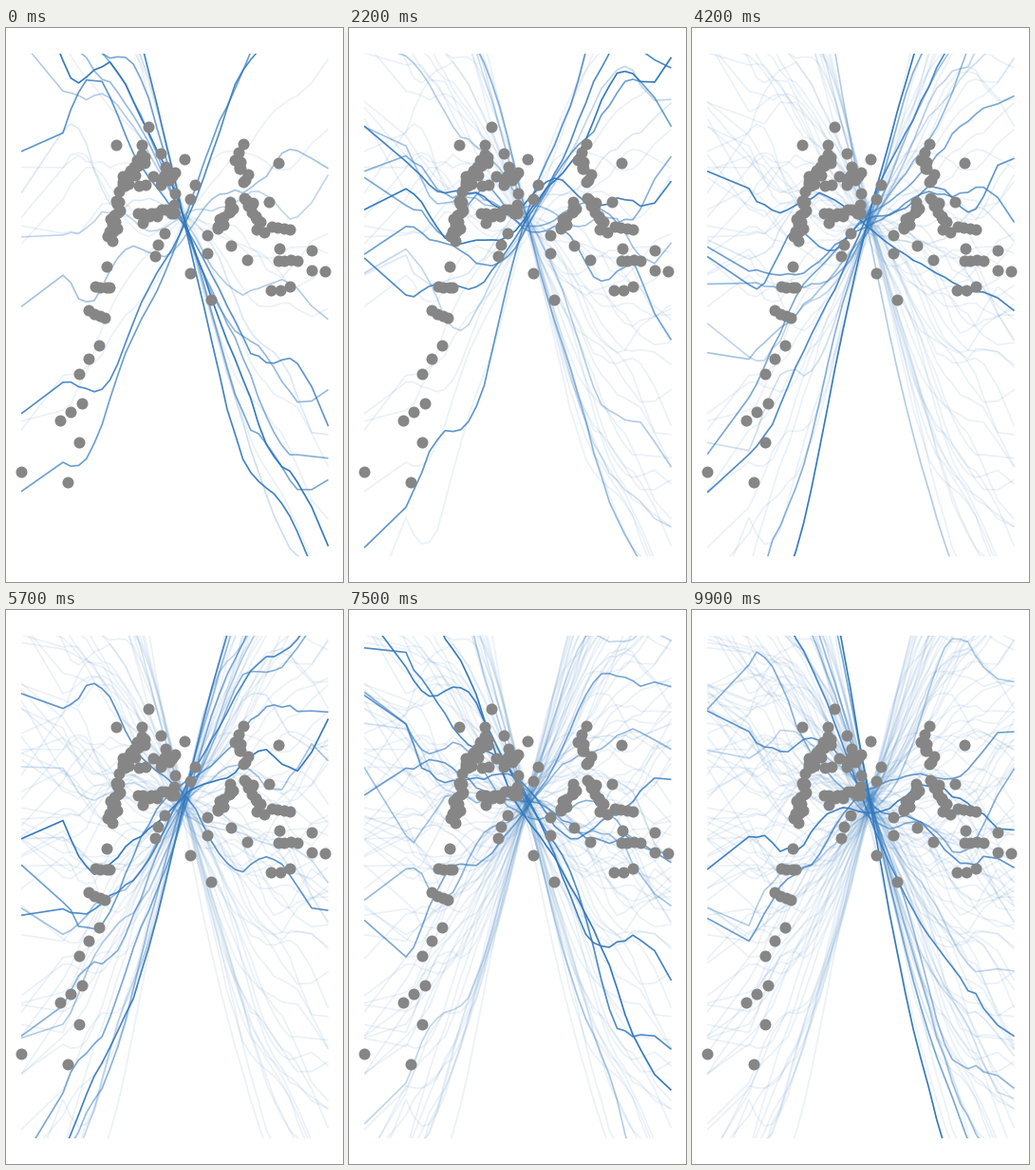
A matplotlib script for the animation above (10 s loop, 355 by 583 pixels).

```python
import numpy as np
import matplotlib.pyplot as plt
from matplotlib.animation import FuncAnimation
from matplotlib.collections import LineCollection

W, H, DPI = 355, 583, 100
X0, X1, Y0, Y1 = 16, 339.5, 26.5, 556
FRAMES, STEP = 100, 100
LEAD = 22            # draws already on stage when the loop starts
FADE, FAINT = 13, 0.10
NECK = (187, 203)    # all curves pass close to this point
REACH = 110          # distance over which a curve levels off
BLUE = (0.20, 0.475, 0.745)
GREY = "#868686"

rng = np.random.default_rng(7)


def strand(x0, y0, x1, y1, n):
    """n points along a segment; long strands are scattered more."""
    t = np.linspace(0, 1, n)[:, None]
    path = np.array([x0, y0]) * (1 - t) + np.array([x1, y1]) * t
    return path + rng.normal(0, 0.8 if n < 6 else 3.5, (n, 2))


loners = [(16, 467), (64.5, 478), (77, 436), (116, 123), (150, 104), (188, 138),
          (193.5, 258), (216, 286), (250, 122), (287, 142), (277, 183),
          (322, 234), (288, 232), (106, 251)]

dots = np.vstack([
    loners,
    # lower left tail
    strand(57, 413, 80, 396, 3),
    strand(77, 363, 98, 334, 3),
    strand(87, 298, 106, 306, 4),
    strand(95, 272, 111, 273, 4),
    # left cloud
    strand(112, 224, 117, 180, 14),
    strand(119, 170, 149, 130, 22),
    strand(140, 198, 184, 192, 14),
    strand(146, 163, 180, 156, 9),
    strand(162, 132, 178, 174, 4),
    strand(157, 240, 166, 217, 3),
    strand(195, 180, 198, 166, 2),
    # right cloud
    strand(246, 133, 252, 164, 9),
    strand(221, 212, 240, 180, 10),
    strand(251, 178, 272, 214, 12),
    strand(281, 210, 299, 212, 4),
    strand(285, 246, 307, 244, 4),
    strand(279, 276, 299, 274, 3),
    strand(323, 257, 339, 256, 2),
    strand(211, 218, 213, 238, 2),
    strand(236, 229, 254, 244, 2),
])

# Sample points: dense in the middle, sparse where the data are sparse
xs = np.concatenate([[X0], np.linspace(60, 299, 30), [307, 322, X1]])
u = xs - NECK[0]
lever = REACH * np.tanh(u / REACH)
far = np.tanh(u / 90) ** 2


def curve(n):
    """One random draw: a line pivoting at the neck, looser at both ends."""
    trend = 1.8 * np.cos(2 * np.pi * (n - LEAD) / 96)
    tilt = np.clip(rng.normal(trend, 2.1), -4.2, 6.3)
    ends = np.where(u < 0, *rng.normal(0, 55, 2)) * far
    waves = sum(rng.normal(0, k ** -0.8) * np.sin(k * np.pi * u / 260 + rng.uniform(0, 2 * np.pi))
                for k in range(2, 8))
    y = NECK[1] + tilt * lever + ends + waves * (14 + 26 * far)
    return np.column_stack([xs, y + rng.normal(0, 1, len(xs)) * (0.8 + 1.8 * far)])


curves = [curve(n) for n in range(LEAD + FRAMES)]

fig = plt.figure(figsize=(W / DPI, H / DPI), dpi=DPI, facecolor="white")
ax = fig.add_axes([X0 / W, 1 - Y1 / H, (X1 - X0) / W, (Y1 - Y0) / H])
ax.set_xlim(X0, X1)
ax.set_ylim(Y1, Y0)
ax.axis("off")

lines = LineCollection([], linewidths=1.2, capstyle="butt", joinstyle="round")
ax.add_collection(lines, autolim=False)
ax.scatter(dots[:, 0], dots[:, 1], s=(12 * 72 / DPI) ** 2, color=GREY,
           linewidths=0, clip_on=False, zorder=3)


def update(frame):
    count = LEAD + frame
    age = np.arange(count)[::-1]
    alpha = FAINT + (1 - FAINT) * np.clip(1 - age / FADE, 0, 1)
    lines.set_segments(curves[:count])
    lines.set_color([(*BLUE, a) for a in alpha])
    return lines,


anim = FuncAnimation(fig, update, frames=FRAMES, interval=STEP,
                     repeat=True, repeat_delay=0, blit=False)
plt.show()
```
